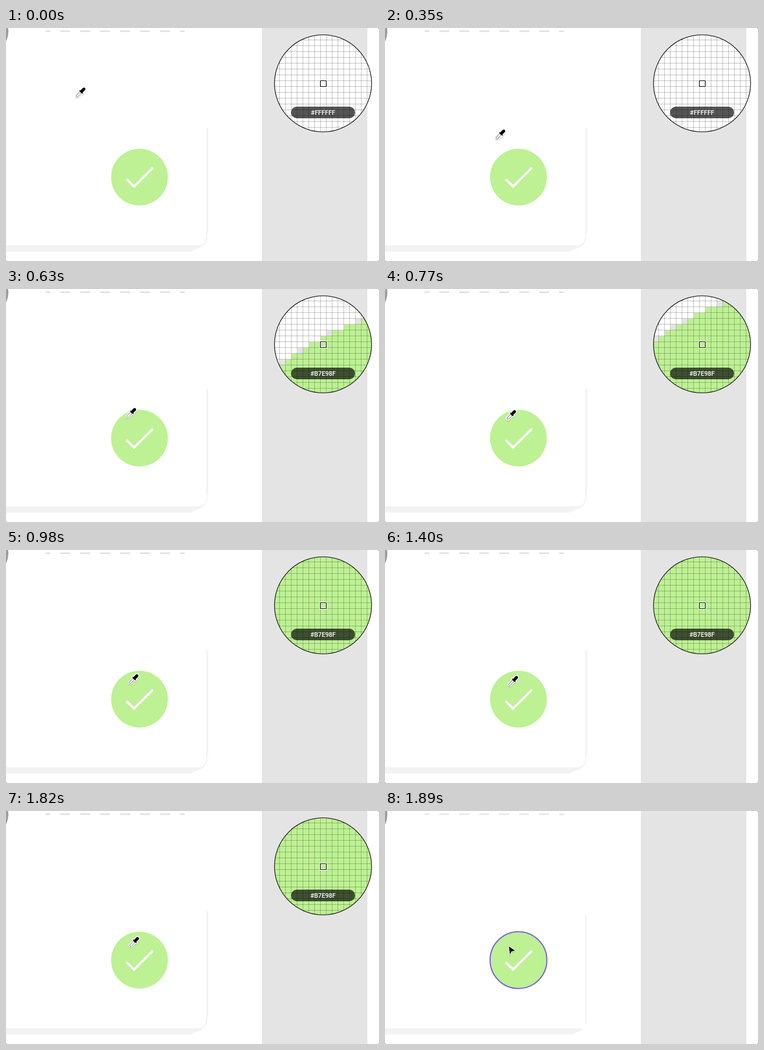
Write an HTML page that moves like this. It is 640 px wide and 400 px high and loops after 2.66 s.

```html
<!DOCTYPE html>
<html lang="en">
<head>
<meta charset="utf-8">
<title>Color picker</title>
<style>
  html, body { margin: 0; width: 100%; height: 100%; overflow: hidden; background: #777; }
  svg { display: block; width: 640px; height: 400px; background: #fff; border-radius: 2.5px; }
  text { font: 500 10.7px Roboto, sans-serif; fill: #fff; text-anchor: middle; }
  .cells { shape-rendering: crispEdges; }
  .outlined { stroke: #fff; stroke-linejoin: round; }
</style>
</head>
<body>
<svg viewBox="0 0 640 400">
  <defs>
    <clipPath id="lensClip"><circle cx="544" cy="95" r="83"/></clipPath>
    <filter id="soft" x="-30%" y="-30%" width="160%" height="160%">
      <feDropShadow dx="0" dy=".8" stdDeviation=".7" flood-opacity=".35"/>
    </filter>
  </defs>

  <path fill="#e4e4e4" d="M439 0H620V400H439Z"/>
  <circle cx="-35" cy="6" r="38.5" fill="#a0a0a0" stroke="#8c8c8c"/>
  <path id="dashes" d="M68 5.5H307" stroke-width="3" stroke-dasharray="17.2 17.05" stroke-dashoffset="9.2"/>
  <path id="cardShadow" fill="#f3f3f3"/>

  <circle id="badge" cx="229" cy="256" r="48.7" fill="#bdf193"/>
  <path d="M207 259.5L219.7 272.2L252 240" fill="none" stroke="#fff" stroke-width="4"/>

  <g id="lens">
    <g clip-path="url(#lensClip)">
      <path fill="#fff" d="M460 11H628V179H460Z"/>
      <path id="edgeCells" class="cells" fill="#e3e5e0"/>
      <path id="greenCells" class="cells" fill="#bdf193"/>
      <path id="grid" stroke="#000" stroke-opacity=".23"/>
    </g>
    <circle cx="544" cy="95" r="83.3" fill="none" stroke="#000" stroke-width="1.1"/>
    <rect x="489" y="135" width="110" height="20" rx="10" fill-opacity=".67"/>
    <text id="label" x="544" y="149"></text>
    <g fill="none">
      <path d="M539.5 90.5h10v10h-10z" stroke="#fff" stroke-width="3"/>
      <path d="M539.5 90.5h10v10h-10z" stroke="#000" stroke-width="1.2"/>
    </g>
  </g>

  <g id="dropper" filter="url(#soft)">
    <g transform="rotate(-46)">
      <path class="outlined" stroke-width="1.6"
        d="M0 0L2 -2.8H11.5V-5H14.2V-3.4H20Q23 -3.2 23 0T20 3.4H14.2V5H11.5V2.8H2Z"/>
      <path fill="#fff" d="M1.4 0L2.7 -1.6H11.5V1.6H2.7Z"/>
    </g>
  </g>
  <path id="arrow" class="outlined" filter="url(#soft)" d="M212 231.5L224 240L217.3 241.5L214 247.8Z"/>
</svg>

<script>
const LOOP = 2660, STEP = 70, PICKED_AT = 1890;
const SHADOW_PICKING = 'M343.5 172H347V352L345.5 353V363Q340 377 324 380L318 384H0V373H328Q343.5 373 343.5 357Z';
const SHADOW_PICKED = 'M343.5 176H346V363L344 367L343.5 360ZM0 373H338L335 378L320 383.5H0Z';

// Dropper tip: time, x, y
const PATH = [
  [0, 120, 119], [140, 152, 149], [350, 190, 191], [490, 203, 213], [560, 206.5, 219.8],
  [630, 207, 221], [980, 211, 230], [1050, 211, 230], [1190, 211.5, 231],
  [1260, 211.5, 231], [1400, 212, 233], [LOOP, 212, 233]
];

const el = id => document.getElementById(id);
const set = (id, attrs) => Object.entries(attrs).forEach(([k, v]) => el(id).setAttribute(k, v));

let grid = '';
for (let i = 0; i < 18; i++) grid += `M${459.5 + i * 10} 10V180M460 ${10.5 + i * 10}H629`;
set('grid', { d: grid });

function tipAt(t) {
  const i = PATH.findIndex(p => p[0] > t);
  const [t0, x0, y0] = PATH[i - 1], [t1, x1, y1] = PATH[i];
  const k = (t - t0) / (t1 - t0);
  return [x0 + (x1 - x0) * k, y0 + (y1 - y0) * k];
}

// Magnifies the badge around the sampled point, one cell per pixel.
function drawLens(x, y) {
  const distance = (i, j) => Math.hypot(x + i - 229, y + j - 256);
  let green = '', edge = '';
  for (let j = -8; j <= 8; j++) {
    for (let i = -8; i <= 8; i++) {
      const d = distance(i, j);
      const cell = `M${539.5 + i * 10} ${90.5 + j * 10}h10v10h-10z`;
      if (d < 48.8) green += cell;
      else if (d < 49.13) edge += cell;
    }
  }
  set('greenCells', { d: green });
  set('edgeCells', { d: edge });
  el('label').textContent = distance(0, 0) < 48.8 ? '#B7E98F' : '#FFFFFF';
}

function frame(now) {
  const t = Math.floor((now % LOOP) / STEP) * STEP;
  const picked = t >= PICKED_AT;
  const [x, y] = tipAt(t);
  for (const id of ['lens', 'dropper']) set(id, { display: picked ? 'none' : 'inline' });
  set('arrow', { display: picked ? 'inline' : 'none' });
  set('badge', { stroke: picked ? '#7b61dc' : 'none', 'stroke-width': 2 });
  set('cardShadow', { d: picked ? SHADOW_PICKED : SHADOW_PICKING });
  set('dashes', { stroke: picked ? '#eaeaea' : '#e4e4e4' });
  set('dropper', { transform: `translate(${x} ${y})` });
  if (!picked) drawLens(x - 0.8, y - 7);
}

const start = performance.now();
(function tick() {
  frame(performance.now() - start);
  requestAnimationFrame(tick);
})();
</script>
</body>
</html>
```
